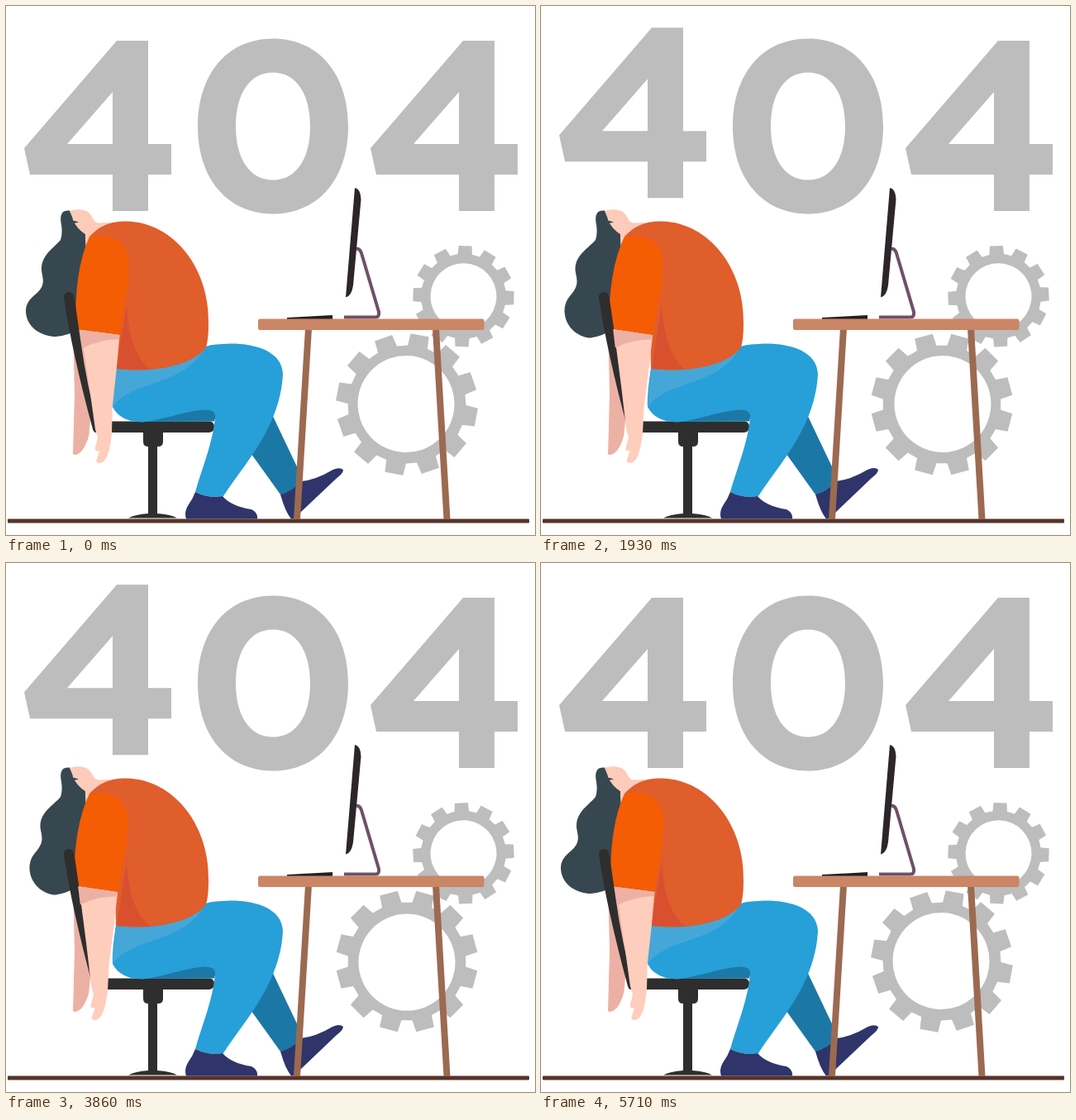
An HTML page that plays this animation: 640x640 px, repeating every 5.78 s.

```html
<!DOCTYPE html>
<html lang="en">
<head>
<meta charset="utf-8">
<title>404</title>
<style>
html, body { margin: 0; width: 100%; height: 100%; overflow: hidden; background: #fff; }
svg { display: block; width: 100vw; height: 100vh; }
</style>
</head>
<body>
<svg viewBox="0 0 640 640">
  <defs>
    <path id="four" fill-rule="evenodd" d="M134 42H172V167H200V204H172V248H129V204H29L22 172ZM129 104V167H74Z"/>
    <path id="zed" d="M-7 -6.5H7L-7 6.5H7" fill="none" stroke="#37474f" stroke-width="2.7"/>
  </defs>

  <g fill="#bdbdbd">
    <use class="digit" href="#four"/>
    <path class="digit" fill-rule="evenodd" d="M323 39.500C378 39.500 414 82 414 145.500S378 251.500 323 251.500S232 209 232 145.500S268 39.500 323 39.500ZM323 80.500C295 80.500 278 106 278 145.500S295 210.500 323 210.500S368 185 368 145.500S351 80.500 323 80.500Z"/>
    <g class="digit"><use href="#four" x="419"/></g>
    <g id="smallGear"></g>
    <g id="bigGear"></g>
  </g>
  <g id="snore">
    <use href="#zed"/><use href="#zed"/><use href="#zed"/>
  </g>

  <rect x="2" y="620.500" width="631" height="5" rx="1" fill="#56342a"/>

  <!-- chair seat -->
  <g fill="#2e2e2e">
    <path d="M112 502.500H246Q252 503 252 509T246 516H112Z"/>
    <path d="M166 515H190V527Q190 533 184 533H172Q166 533 166 527Z"/>
    <path d="M172 530H183V614Q200 615 207 619.500H148Q156 615 172 614Z"/>
  </g>

  <!-- legs and shoes -->
  <path d="M294 538L319 488L358 570L356 583Q345 591 332 591Z" fill="#1b78a6"/>
  <path id="foot" d="M332 591Q346 588 357 575Q375 573 395 561Q404 557 408 561Q408 565 400 571L357 612Q350 621 345 620.500Q338 612 332 591Z" fill="#2f356a"/>
  <path d="M160 503C190 498 215 490 240 487H256L252 502.500Z" fill="#1c78a7"/>
  <path d="M133 438Q128 470 129 485Q138 503 165 503.500C190 501 215 490 240 488.500Q254 488 253 498C250 530 236 562 229 588Q245 596 263 593C287 555 332 510 335 445C334 418 302 408 270 408.500Q252 409 241 412Z" fill="#279fd8"/>
  <path d="M133 438L129 486C150 452 215 462 241 413Z" fill="#45a7d7"/>
  <path d="M229 588Q245 596 262 593Q272 605 297 609Q305 613 304 620.500H218Q215 612 221 603Q226 596 229 588Z" fill="#2f356a"/>

  <!-- upper body -->
  <path d="M81 385L83 470L81 542Q85 545 92 538Q101 525 101 512L108 440L137 395Z" fill="#ecb1a4"/>
  <path id="hair" fill="#37474f"/>
  <path d="M77 248C86 245 97 246 101 251C105 255 106 262 112 262.500L125 262Q129 264 126 270C118 275 108 277 102 279L97 290L96 276Q86 270 82 260Z" fill="#fdcbb9"/>
  <path d="M80 259L88 261.500L82 263Z" fill="#37474f"/>
  <path d="M101 279C112 268 122 260.500 146 260.500C205 262 247 320 245 385Q245 403 242 413C230 430 195 442 150 440.500L133 439L130 330Z" fill="#e05d2c"/>
  <path d="M146 362Q141 390 134 439L175 440C155 425 148 395 146 362Z" fill="#d9502f"/>
  <path class="arm" d="M101 279Q135 274 145 296Q151 312 146 345L137 398L84 391Q82 320 101 279Z" fill="#f45d03"/>
  <path d="M70 353Q70 346 76 346T83 355L91 410Q98 460 113 516H109Q106 516 105 512Q80 420 70 353Z" fill="#2e2e2e"/>
  <g class="arm">
    <path d="M90 391.800L137 398L133 440L128 485L127 517Q124 545 117 551Q111 555 108 551L112 538Q106 540 107 534L110 522L107 512L100 460Z" fill="#ffcdbc"/>
    <path d="M89 391.700L137 398L136.500 403Q110 404 92 414Z" fill="#ecb1a4"/>
  </g>

  <!-- desk -->
  <path d="M362 390H370L356 621H348ZM516 390H524L537.500 621H529.500Z" fill="#9c6a50"/>
  <path d="M424 294Q428 293 430 299L451 370Q452 376.500 447 376.500H409" fill="none" stroke="#6f5069" stroke-width="4"/>
  <path d="M422 220Q429 221 429.500 234L420 338Q418 351 411 352.500Z" fill="#2c2529"/>
  <path d="M340 377L395 374V379H340Z" fill="#231f20"/>
  <rect x="305" y="378.500" width="273.500" height="13.500" rx="2.500" fill="#cb8567"/>
</svg>
<script>
const LOOP = 5780, FRAMES = 81, TURN = 2 * Math.PI;
const all = s => [...document.querySelectorAll(s)];
const byId = id => document.getElementById(id);
const clamp = v => Math.max(0, Math.min(1, v));
const easeOut = p => 1 - (1 - clamp(p)) ** 2.2;

const digits = all('.digit'), arms = all('.arm'), zeds = all('#snore use');
const foot = byId('foot'), hair = byId('hair');
const gears = [
  { el: byId('smallGear'), x: 553.5, y: 351.2, tip: 61.5, root: 51.5, hole: 40, off: 0, start: -2.5, dir: -1 },
  { el: byId('bigGear'), x: 485, y: 482, tip: 86, root: 71.5, hole: 58.5, off: 1.1, start: -15, dir: 1 }
];

function buildGear({ el, tip, root, hole, off }) {
  const points = [];
  for (let i = 0; i < 12; i++) {
    for (const [r, d] of [[root, -.17], [tip, -.13], [tip, .13], [root, .17]]) {
      const a = i * TURN / 12 + d;
      points.push(`${(r * Math.sin(a)).toFixed(2)},${(-r * Math.cos(a)).toFixed(2)}`);
    }
  }
  const a = (210 + 15) * TURN / 360;
  el.innerHTML = `<polygon points="${points.join(' ')}"/>` +
    `<circle cx="${off * Math.cos(a)}" cy="${off * Math.sin(a)}" r="${hole}" fill="#fff"/>`;
}
gears.forEach(buildGear);

// x, y, angle, size, then grow start/end and shrink start/end
const snores = [
  [57.5, 143, 10, 1.2, 8.2, 12, 15, 24],
  [81.5, 153.5, 13, 1.08, 5.2, 9.5, 11, 21],
  [101.5, 166.5, 25, 1.02, 2.2, 6.5, 10, 20]
];

function hop(phase, index) {
  const x = (phase + .78) / 2.8 - index;
  return -30.5 * (easeOut(x) - easeOut(x - 1));
}

function hairPath(w) {
  const u = 2 * w, l = 6 * w;
  return `M70 248.500Q65 252 66.500 262Q69 274 66 283C58 293 ${42 - u} 301 ${43 - u} 320` +
    `C${44 - u} 328 ${47 - u} 334 ${42 - w} 342C${36 + w} 351 ${24 + l} 354 ${24 + l} 370` +
    `C${25 + l} 391 ${46 + l / 2} ${400 + u} 60 ${400 + u}Q76 399 86 391L97 300L96 276Q88 270 81 260Q81 250 77 247.500Q73 247 70 248.500Z`;
}

function draw(n) {
  const cycle = n % 27;
  const phase = cycle < 14 ? cycle : cycle - 14;
  digits.forEach((el, i) => el.setAttribute('transform', `translate(0 ${hop(phase, i)})`));

  zeds.forEach((el, i) => {
    const [x, y, angle, size, a, b, c, d] = snores[i];
    const s = size * Math.min(clamp((cycle - a) / (b - a)), clamp((d - cycle) / (d - c)));
    el.setAttribute('transform', `translate(${x} ${y}) rotate(${angle}) scale(${s})`);
    el.style.display = s > 0 ? '' : 'none';
  });

  for (const g of gears) {
    const angle = g.start + g.dir * 360 * n / FRAMES;
    g.el.setAttribute('transform', `translate(${g.x} ${g.y}) rotate(${angle})`);
  }

  hair.setAttribute('d', hairPath(Math.sin(Math.PI * n / FRAMES) ** 2));

  const sway = .1 - .85 * Math.cos(5 * TURN * n / FRAMES);
  arms.forEach(el => el.setAttribute('transform', `rotate(${sway + .45} 115 285)`));

  const tap = (1 - Math.cos(TURN * cycle / 27)) / 2;
  foot.setAttribute('transform', `rotate(${11.5 * tap} 345 582)`);
}

let shown = -1;
function tick() {
  const t = performance.now() % LOOP;
  const n = Math.min(FRAMES - 1, Math.floor((t + 3) * FRAMES / LOOP));
  // the loop opens on its closing pose
  if (n !== shown) draw((shown = n) || FRAMES - 1);
  requestAnimationFrame(tick);
}
tick();
</script>
</body>
</html>
```
